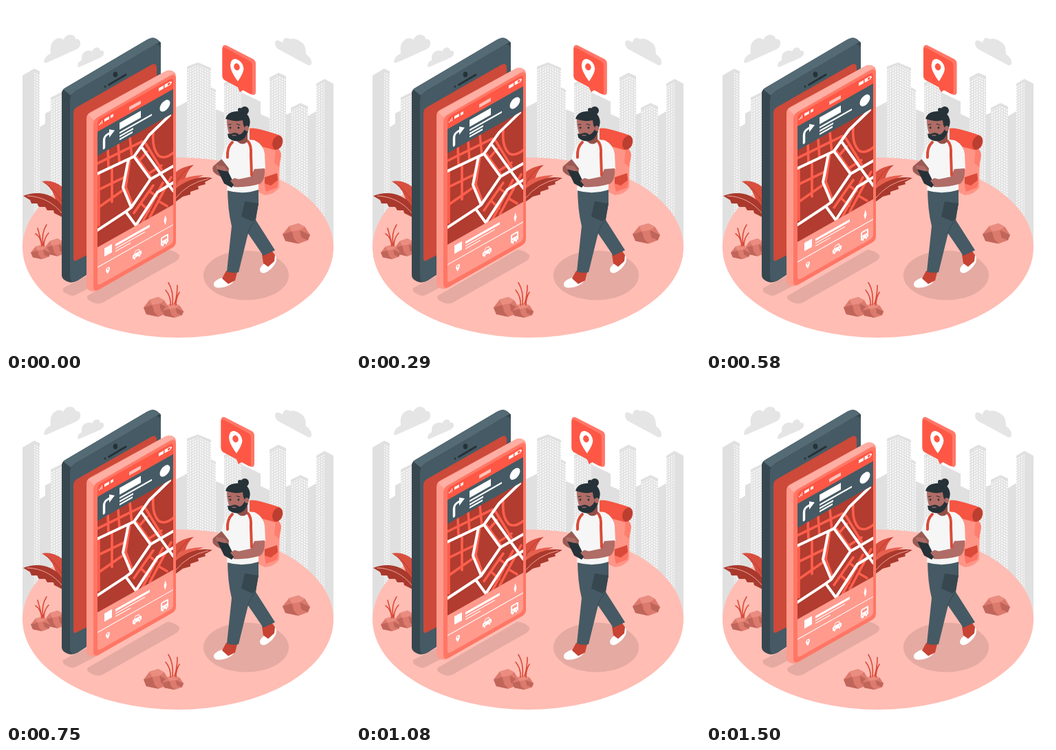
An HTML page for the animation above (1540 ms loop, 500 by 500 pixels).

```html
<!DOCTYPE html>
<html lang="en">
<head>
<meta charset="utf-8">
<title>Navigation</title>
<style>
html, body { margin: 0; width: 100%; height: 100%; overflow: hidden; background: #fff; }
svg { display: block; width: 100vw; height: 100vh; }
.line { fill: none; stroke-linecap: round; stroke-linejoin: round; }
</style>
</head>
<body>
<svg viewBox="0 0 500 500">
<defs>
  <pattern id="winR" width="3.6" height="4" patternUnits="userSpaceOnUse" patternTransform="skewY(26)"><path d="M.7 .8h2.2v2.3h-2.2z" fill="#fafafa"/></pattern>
  <pattern id="winL" width="3.6" height="4" patternUnits="userSpaceOnUse" patternTransform="skewY(-26)"><path d="M.7 .8h2.2v2.3h-2.2z" fill="#fafafa"/></pattern>
  <clipPath id="map"><path d="M133 217L243 155V289L133 351z"/></clipPath>
  <g id="rock">
    <path d="M0 16L9 4 22 0 31 5 38 17 35 25 22 30 4 26z" fill="#dc7a6d"/>
    <path d="M9 4L22 0 31 5 24 10 13 12z" fill="#ea8d80"/>
    <path d="M0 16L13 12 16 23 22 30 4 26zM24 10L38 17 35 25 26 21z" fill="#c0655a"/>
  </g>
</defs>

<g fill="#e0e0e0">
  <path d="M24 351V101L41 91 49 95V176L57 171V156L65 152V133L81 125H225L248 147 263 139V88L279 82 298 90V118L305 122V150L317 155V112L330 105 343 112V126L370 139V157L383 163V104L396 97 407 102V158L414 155V148L428 141 439 146V160L451 153V113L463 106 476 113V351z"/>
  <g fill="#e5e5e5">
    <path d="M55 81Q56 73 65 69Q63 54 71 49Q78 44 83 49Q88 40 96 42Q101 44 101 48Q109 47 108 56Q107 62 98 65L60 82Q55 84 55 81z"/>
    <path d="M104 87Q104 81 110 79Q109 67 118 65Q123 64 125 66Q129 58 135 61Q137 63 137 65Q143 64 142 70Q141 74 133 77L108 88Q104 90 104 87z"/>
    <path d="M444 84Q445 76 436 70Q436 55 428 52Q421 46 413 48Q404 43 402 53Q391 46 391 55Q392 62 400 65L439 86Q443 87 444 84z"/>
  </g>
</g>
<g fill="url(#winR)">
  <path d="M41 95L49 99V330H41zM279 86L298 94V330H279zM298 121L305 125V330H298zM330 109L343 116V330H330zM396 101L407 106V330H396zM428 145L439 150V330H428z"/>
</g>
<g fill="url(#winL)">
  <path d="M65 137L81 129V330H65zM263 92L279 86V330H263zM317 116L330 109V330H317zM383 108L396 101V330H383zM414 152L428 145V330H414zM451 117L463 110V330H451z"/>
</g>

<ellipse cx="250" cy="351" rx="226" ry="131" fill="#ffbdb4"/>
<g fill="#e5aaa2">
  <path d="M83 410L118 392 140 400 101 420Q95 423 88 418 81 415 83 410z"/>
  <path d="M119 421L235 354Q246 356 252 362 253 367 247 371L144 429Q136 435 127 431 115 426 119 421z"/>
  <ellipse cx="349" cy="391.500" rx="62" ry="36"/>
</g>

<!-- leaves and rocks -->
<path d="M52 255Q68 252 82 263V300Q74 288 70 275 64 261 52 255zM246 242Q257 233 273 231 264 238 261 249 256 262 246 270z" fill="#d94f3f"/>
<path d="M246 256Q268 245 287 246 262 256 246 274z" fill="#e8604f"/>
<path d="M25 276Q46 268 64 276 77 282 82 292V307L70 301 69 297 60 297 57 292 48 292 45 287 37 287 35 282z" fill="#aa392d"/>
<path d="M246 266Q272 245 300 250L289 256 290 259 279 262 280 266 268 270 268 274 257 277 246 285z" fill="#aa392d"/>
<path class="line" stroke="#ffbdb4" stroke-width=".8" d="M31 276Q62 277 82 302M246 280Q264 257 294 251"/>
<path class="line" stroke="#aa392d" stroke-width=".8" d="M56 257Q72 266 82 286M246 261Q255 241 270 232"/>
<use href="#rock" transform="translate(56 338) scale(.86)"/>
<use href="#rock" transform="translate(36 347) scale(.75 .7)"/>
<use href="#rock" transform="translate(402 316) scale(1.05 .98)"/>
<use href="#rock" transform="translate(200 423) scale(.97 .96)"/>
<use href="#rock" transform="translate(227 432) scale(.82 .7)"/>
<path class="line" stroke="#d94a38" stroke-width="1.600" d="M52 349Q51 336 43 331M53 348Q50 338 46 323M54 347Q51 330 59 318M55 349Q55 337 62 330M239 435Q240 422 232 413M242 434Q244 415 236 402M245 433Q249 421 249 406M247 435Q247 424 252 416"/>

<!-- rear phone -->
<path d="M81 127Q81 122 86 119L205 49Q213 44 219 48L225 53V320L104 399Q95 404 88 400 81 397 81 391z" fill="#37474f"/>
<path d="M83 121L205 49Q213 44 219 48L224 52 101 124 94 130z" fill="#546a74"/>
<path d="M93 137Q93 129 100 125L213 58Q225 52 225 64V322L104 399Q93 404 93 393z" fill="#455a64"/>
<path d="M98 156Q98 150 103 147L212 85Q219 82 219 90V310L104 369Q98 373 98 367z" fill="#cd4939"/>
<g fill="#263238">
  <ellipse cx="159" cy="99.500" rx="3.300" ry="4"/>
  <circle cx="144" cy="117" r="1.500"/>
  <path class="line" stroke="#263238" stroke-width="3" d="M149.500 114.500L174 100"/>
</g>

<!-- front phone -->
<g id="phone">
  <path d="M117 163Q117 157 122 154L232 94Q239 91 244 95 247 97 247 102V341Q247 348 241 351L134 412Q128 416 122 413 117 411 117 405z" fill="#ff9a8c"/>
  <path d="M119 157L232 94Q239 91 245 96L133 161 128 165z" fill="#ffaea3"/>
  <path d="M127 172Q127 165 133 161L238 101Q247 96 247 106V341Q247 348 241 351L134 412Q127 415 127 407z" fill="#ff7665"/>
  <g transform="matrix(1 -.565 0 1 133 0)">
    <path d="M0 170Q0 165 5 165H105Q110 165 110 170V219H0z" fill="#ff5745"/>
    <path d="M0 182H110V218H0z" fill="#455a64"/>
    <g fill="#fff">
      <path d="M2 174v-2h1v2zM4 174v-3.500h1v3.500zM6 174v-5h1v5zM10 169h7v4h-7zM19 169h4v4h-4zM89 169h7v4.500h-7z"/>
      <path d="M98 169h8v4h-8z" fill="none" stroke="#fff"/>
      <path d="M98 169h4v4h-4zM106 170h2v2h-2z"/>
      <path d="M46 172h17v5h-17z" fill="#ffc1b8"/>
      <path d="M32 187h31v10h-31zM32 200.500h47v2.500h-47zM32 205.500h20v2.500h-20zM32 210h19v2.500h-19z"/>
      <path d="M17 188L25 194 17 200z"/>
      <circle cx="98" cy="199.500" r="7.500"/>
    </g>
    <path class="line" stroke="#fff" stroke-width="3.500" stroke-linecap="butt" d="M9.500 211V200Q9.500 194 15 194H18"/>
  </g>
  <g clip-path="url(#map)">
    <path d="M130 150H245V355H130z" fill="#b13c2f"/>
    <g class="line" stroke="#ff5f4d" stroke-width="3.600">
      <path d="M133 228L198 196M148 206L149 235M163 200L165 228M180 190L183 220M135 242V318M154 236V284M133 267L172 248M133 293L170 267M214 184Q212 207 222 217 231 223 245 211"/>
      <path d="M180 223L174 262 183 286M190 219L210 247M203 199L226 237M193 225L205 211M207 243L226 231M186 300L214 260M198 314L228 256M209 306L240 248M196 286L208 297M208 268L219 276M222 283L234 290"/>
    </g>
    <path class="line" stroke="#fff" stroke-width="4" d="M133 243L186 218 208 187 238 158M186 218L210 251 243 232M178 222L170 263 182 292 210 251M133 325L174 298 182 292M174 298L190 320M190 316L220 270 243 256M197 204L222 239 243 268"/>
  </g>
  <g transform="matrix(1 -.565 0 1 133 0)">
    <path d="M0 350H110V401Q110 406 105 406H5Q0 406 0 401z" fill="#ff9a8d"/>
    <g fill="#fff">
      <path d="M10 357h11v12h-11zM26 360h50v3.500h-50zM26 366h43v1.200h-43zM26 370h22v1.200h-22zM0 378.500h110v1.200h-110z"/>
      <path d="M98.500 359L100.500 366 98.500 373 96.500 366z"/>
      <path d="M15 397Q11 391 12.500 388.500 15 386 17.500 388.500 19 391 15 397z"/>
      <circle cx="15" cy="390" r="1.200" fill="#ff9a8d"/>
      <path d="M51 396v-5l2-1 2-4h5l2 4 2 1v5h-2v2h-2v-2h-5v2h-2v-2zM92 390q0-2 2-2h7q2 0 2 2v10h-2v2h-2v-2h-3v2h-2v-2h-2z"/>
      <path d="M54 390l1.500-3h4l1.500 3zM53 393h2v1h-2zM60 393h2v1h-2zM94 390h7v4h-7zM94 397h2v1h-2zM99 397h2v1h-2z" fill="#ff9a8d"/>
    </g>
  </g>
</g>

<!-- location bubble -->
<g id="bubble">
  <path d="M314.500 61Q315 56 320 57L359 77Q363 79 363 84V125Q363 130 358 129L345 122 340 125 337 118 318 107Q314.500 105 314.500 101z" fill="#ff7768"/>
  <path d="M314.500 63Q314.500 59 319 61L354 80Q358 82 358 87V125Q358 130 353 127L344 122 340 125 337 118 318 108Q314.500 106 314.500 101z" fill="#ff5745"/>
  <path d="M337 109.500Q326 95 326 86 327 76 334 77 344 80 345.500 91 345 98 337 109.500z" fill="#fff"/>
  <ellipse cx="335.500" cy="88.500" rx="4.200" ry="5.200" transform="rotate(-15 335.500 88.500)" fill="#ff5745"/>
</g>

<!-- backpack -->
<path d="M366 205L393 203Q398 206 398 214L397 264Q390 274 376 275L366 270z" fill="#ff9587"/>
<path d="M392 206Q399 207 400 217L397 234 390 228z" fill="#ff7e6e"/>
<path d="M376 249L394 243Q397 254 394 264L378 270Q375 260 376 249z" fill="#ff7464"/>
<path d="M376 249L394 243 395 253 385 261 376 258z" fill="#d94a38"/>
<path d="M354 178Q361 175 398 188 405 193 401 203 395 212 386 208L354 200z" fill="#f55542"/>
<ellipse cx="394.500" cy="198.500" rx="7" ry="10.500" transform="rotate(18 394.500 198.500)" fill="#bb3e30"/>

<!-- walker -->
<g fill="#fff">
  <path d="M389 360Q395 365 392 373 386 384 376 388 369 389 369 383 370 378 376 374z"/>
  <path d="M317 394L334 390Q335 400 324 406 313 411 305 409 300 406 303 401 308 396 317 394z"/>
</g>
<path d="M372 361L386 355 391 362 390 371 381 379 374 374zM320 385L336 387 333 399 323 404 314 396z" fill="#c74333"/>
<path d="M340 290L367 285 363 311 391 355 374 363 346 322z" fill="#455a64"/>
<path d="M322 262L367 264 367 287Q363 312 353 326L338 387Q329 389 321 386L328 320Q322 296 322 262z" fill="#455a64"/>
<path class="line" stroke="#37474f" d="M363 311Q357 316 351 331"/>
<path d="M347 284L367 287 363 309 358 313 342 306z" fill="#37474f"/>
<path d="M324 201Q318 207 314 222L301 233Q298 240 306 245L322 253 328 238 325 222z" fill="#9b5b54"/>
<path d="M325 198L342 193 361 195Q374 201 376 215L377 237 367 239 367 267Q344 275 321 268L324 236 313 222Q317 204 325 198z" fill="#f6f6f6"/>
<path d="M361 237L376 236Q377 252 370 258 353 264 331 263L328 254 356 248z" fill="#b06c66"/>
<path d="M306 235L323 241 332 259 328 264 317 258z" fill="#263238"/>
<path d="M305 231L317 233 322 239 318 240 306 237zM326 254L332 250 339 252 332 261z" fill="#b06c66"/>
<path class="line" stroke="#d94b39" stroke-width="4" d="M329 198Q321 205 322 220M351 196Q357 201 356 217L357 246"/>
<path d="M334 183L351 184 351 197Q344 204 336 197z" fill="#8f5049"/>
<path d="M321 164Q335 156 349 166L352 183Q347 196 333 196 321 190 321 164z" fill="#b06c66"/>
<g fill="#263238">
  <circle cx="347" cy="152" r="6"/><circle cx="340" cy="151" r="3"/>
  <path d="M319 164Q322 153 337 153 351 153 354 164 356 171 352 179L349 181 345 173 344 166Q334 169 319 164z"/>
  <path d="M322 185Q325 187 329 185 335 183 339 187 346 185 348 175L352 178Q350 193 340 196 329 198 323 191z"/>
  <circle cx="326" cy="177" r="1.400"/><circle cx="338" cy="177" r="1.400"/>
</g>
<path class="line" stroke="#263238" d="M323 172.500L327 172M335 171.500L340 173"/>
<path class="line" stroke="#c9857a" stroke-width="1.200" d="M329 188L334 188"/>
<ellipse cx="350" cy="178" rx="3" ry="4" fill="#b06c66"/>
</svg>
<script>
const phone = document.getElementById('phone');
const bubble = document.getElementById('bubble');
const LOOP = 1540, STEPS = 36, REST_Y = 0.8;
// Horizontal offsets of the bubble at every tenth of the cycle
const shake = [0, -1, 2, -2, 2, -2, 2, -2, 2, -1, 0];

function draw() {
  const time = performance.now() % LOOP;
  const step = Math.min(STEPS, Math.floor((time + 4) * 0.024)); // 24 steps a second
  const phase = step / STEPS;
  const lift = 10 * (1 - Math.abs(1 - 2 * phase));
  const i = Math.min(9, Math.floor(phase * 10));
  const x = shake[i] + (shake[i + 1] - shake[i]) * (phase * 10 - i);
  phone.setAttribute('transform', `translate(0 ${REST_Y - lift})`);
  bubble.setAttribute('transform', `translate(${x} 0)`);
  requestAnimationFrame(draw);
}
draw();
</script>
</body>
</html>
```
